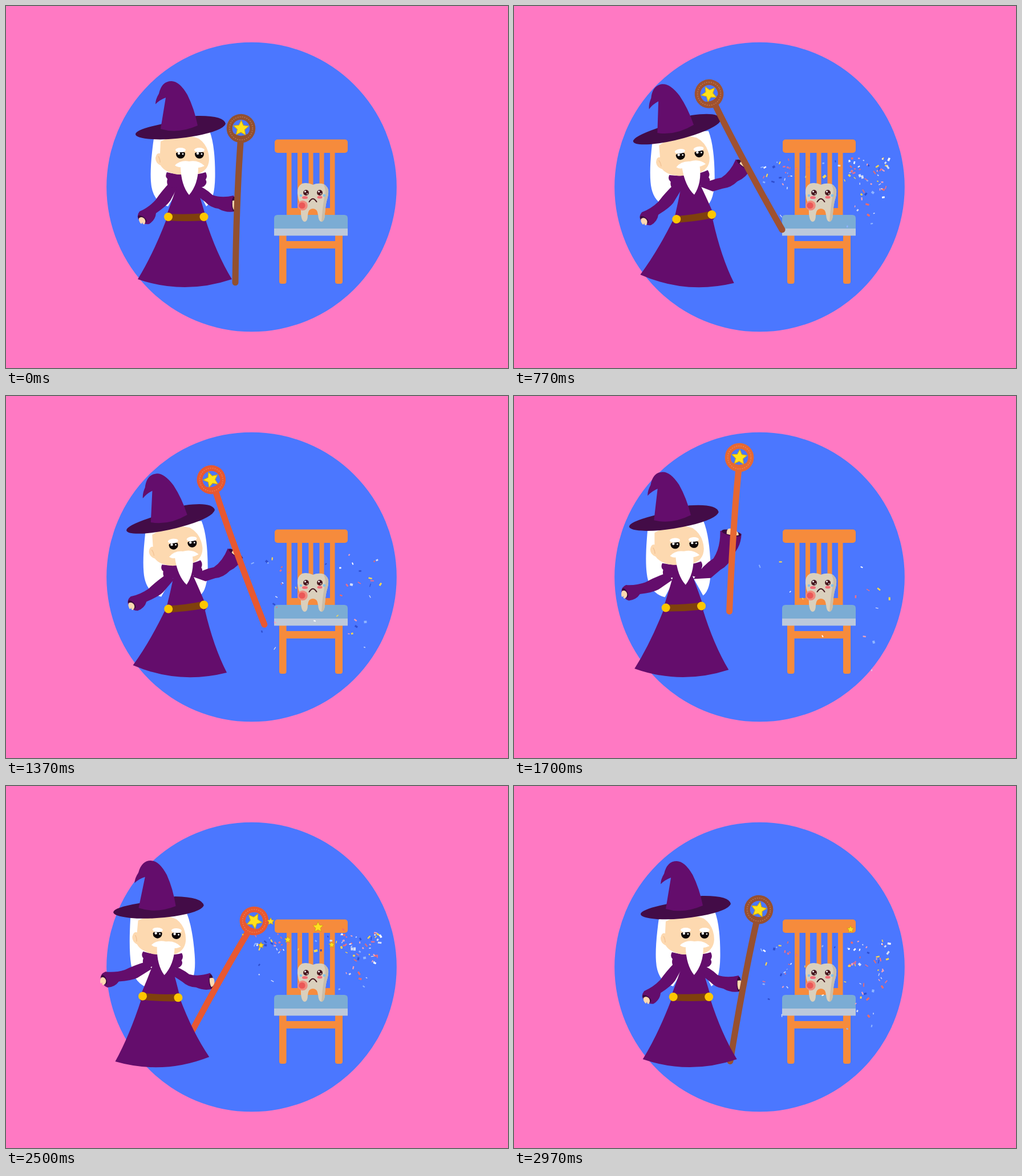
These frames come from a looping animation (880x636 px, 3010 ms). An HTML page:

```html
<!DOCTYPE html>
<html lang="en">
<head>
<meta charset="utf-8">
<title>Wizard and tooth</title>
<style>
html, body { margin: 0; width: 100%; height: 100%; overflow: hidden; background: #ff79c3; }
svg { display: block; width: 100vw; height: 100vh; }
</style>
</head>
<body>
<svg viewBox="0 0 880 636">
  <rect width="880" height="636" fill="#ff79c3"/>
  <circle cx="430.5" cy="318" r="254.3" fill="#4b77ff"/>

  <g id="chair" fill="#f68b3c">
    <rect x="471" y="234.500" width="128" height="23.500" rx="5"/>
    <path d="M492 257h8.500v98h67.500v-98h8.500v111h-84.500zM511 257h8v100h-8zM530.500 257h8v100h-8zM549.500 257h8v100h-8z"/>
    <path d="M479 402h12.500v11h85.500v-11h13v82q0 4-4 4h-5q-4 0-4-4v-58h-85.500v58q0 4-4 4h-4.500q-4 0-4-4z"/>
    <path d="M470 392v-19q0-6 6-6h117q6 0 6 6v19z" fill="#7bacd4"/>
    <rect x="470" y="391" width="129" height="12.500" fill="#bcc9db"/>
  </g>

  <g id="confetti"></g>

  <g id="tooth">
    <path d="M538 314Q528 309 519 312Q510 317 511 329Q512 339 515 347Q517 354 517 365Q518 379 524 379Q529 378 529 367Q530 356 538 356Q546 356 547 367Q548 379 553 379Q559 378 559 365Q560 352 562 343Q566 331 565 323Q562 313 553 312Q545 311 538 314Z" fill="#dad0bd"/>
    <path d="M557 314Q562 324 558 337Q555 352 553 379Q559 378 559 365Q560 352 562 343Q566 331 565 323Q562 315 557 314Z" fill="#c9bda9"/>
    <g fill="#f26d78"><ellipse cx="524" cy="336.500" rx="5" ry="2.600"/><ellipse cx="550" cy="336" rx="4.500" ry="2.500"/></g>
    <g fill="#461820"><circle cx="526" cy="328" r="4.900"/><circle cx="550" cy="328" r="4.900"/></g>
    <g fill="#fff"><circle cx="524.500" cy="326" r="1.500"/><circle cx="528" cy="330" r=".9"/><circle cx="548.500" cy="326" r="1.500"/><circle cx="552" cy="330" r=".9"/></g>
    <g fill="#83c1ed"><circle cx="517" cy="333" r="2.200"/><circle cx="558" cy="333" r="2.400"/></g>
    <path d="M531.500 344Q538 333.500 544.500 344" fill="none" stroke="#461820" stroke-width="2" stroke-linecap="round"/>
    <circle cx="520" cy="350.500" r="8.800" fill="#f18a7d"/><circle cx="519" cy="350.500" r="5.600" fill="#ea5757"/>
  </g>

  <path id="hair" d="M260 226Q252 280 254 308Q256 344 284 352L304 318H334L351 352Q366 342 366.500 300Q367 246 357 220Z" fill="#fff"/>

  <g id="rightArm">
    <path d="M330 312Q350 320 362 332Q378 338 399 333Q405 347 401 361Q386 364 372 356Q358 354 349 344L336 334Z" fill="#640d6c"/>
    <ellipse cx="399.500" cy="348" rx="3.800" ry="13" fill="#380a3d"/>
    <path d="M397 342q8-2 8 4q1 9-6 12q-3-5-2-16z" fill="#fdd9b0"/>
  </g>
  <g id="leftArm">
    <path d="M288 309Q272 326 262 341Q250 354 234 361Q228 369 233 376Q242 385 251 383Q262 376 263 364Q282 351 288 342L302 316Z" fill="#640d6c"/>
    <ellipse cx="239" cy="374" rx="9" ry="4" transform="rotate(35 239 374)" fill="#380a3d"/>
    <path d="M233 373q4-4 9 0q4 4 1 10q-3 2-4-3q-1 4-3 2q-4-5-3-9z" fill="#fdd9b0"/>
  </g>

  <g id="upper">
    <path d="M282 292Q300 297 318 296Q336 297 350 292Q354 299 350 305Q354 311 347 317Q341 320 334 317Q343 345 349 366V380H282V366Q291 342 299 318Q290 321 284 316Q281 310 283 304Q278 299 282 292Z" fill="#640d6c"/>
    <path d="M271 238Q304 220 338 233Q356 246 356 270Q355 291 332 296H301Q278 292 271 280Q262 276 262 267Q264 257 270 259Z" fill="#fdd9b0"/>
    <path d="M267 264q3 4 3 11" fill="none" stroke="#f3c395" stroke-width="1.500"/>
    <g id="eyes"></g>
    <path d="M296 280Q306 270 321 273Q337 270 348 281Q341 284 337 284Q337 313 321 332Q307 315 306 283Q301 284 296 280Z" fill="#fff"/>
    <path d="M227 225Q228 217 270 208L334 193Q382 192 385 207Q380 219 334 228Q290 236 256 234Q227 232 227 225Z" fill="#430c47"/>
    <path d="M271 216L280 161Q269 165 262 172.500Q262 164 268 154Q273 132 290 132Q304 132 318 156Q330 180 336 210Q302 225 271 216Z" fill="#640d6c"/>
  </g>

  <g id="staff">
    <path id="pole" d="M0 23Q-4 120-1 271" fill="none" stroke-width="11" stroke-linecap="round"/>
    <path id="base" d="M-12 9Q0 17 12 9L9 17H-9Z"/>
    <circle id="ring" r="20.300" fill="none" stroke-width="10"/>
    <circle r="20.300" fill="none" stroke="#ffc07a" stroke-opacity=".35" stroke-width="1.500" stroke-dasharray="2 2"/>
    <circle id="glow" r="14" fill="#ffdf12"/>
    <path id="orb" fill="#ffe21a" stroke="#d9a900" stroke-width="1" stroke-linejoin="round"/>
  </g>

  <path id="skirt" d="M282 373Q258 436 231 480Q313 508 396 480Q369 436 349 373Z" fill="#640d6c"/>
  <g id="belt">
    <path d="M282 364H349L351 378H280Z" fill="#640d6c"/>
    <path d="M284 365Q316 367 347 364V377Q316 379 284 377Z" fill="#7f400d"/>
    <g fill="#fdc600"><circle cx="284.500" cy="370.500" r="7.500"/><circle cx="347" cy="370.500" r="7.500"/></g>
  </g>
  <g id="magic"></g>
</svg>
<script>
const LOOP = 3010, STEP = 100 / 3;
const $ = id => document.getElementById(id);
const make = (parent, tag, attrs) => {
  const el = document.createElementNS('http://www.w3.org/2000/svg', tag);
  for (const key in attrs) el.setAttribute(key, attrs[key]);
  return parent.appendChild(el);
};

// time, hip, lean, skirt, hair, left, right, reach, ring x, ring y, staff, heat, gold
const poses = [
  [0, 0, 0, 0, 0, 0, 0, 1, 412, 215, 1.9, 0, 0],
  [370, 0, -2.6, 1.7, 0, 1, -15, 1.06, 400, 196, -6.2, 0, 0],
  [770, 0, -7.5, 5.2, -1, 3, -53.5, 1.1, 342, 154, -28.4, .15, 0],
  [1000, 0, -9, 5.8, -1, 5, -56, 1.1, 344, 145, -27, .5, 0],
  [1370, 0, -6.5, 4.5, -1, 12, -55, 1.1, 360, 147, -20.2, 1, 0],
  [1750, -22, -2, 0, -3, 30, -79, 1.35, 402, 106, 8, 1, .3],
  [2030, -45, 3.6, -4.2, -7, 45.5, -5, 1, 456, 251, 38.8, 1, 1],
  [2500, -45, 2.4, -2.8, -5, 30, -5, 1, 435, 237, 28.9, 1, 0],
  [2970, -5, .1, 0, 0, .6, 0, 1, 429, 217, 10.3, .05, 0]
];

// Monotone cubic interpolation of one pose column
const slope = (i, c) => (poses[i + 1][c] - poses[i][c]) / (poses[i + 1][0] - poses[i][0]);
function tangent(i, c) {
  if (i === 0 || i === poses.length - 1) return slope(Math.max(0, i - 1), c);
  const a = slope(i - 1, c), b = slope(i, c);
  return a * b <= 0 ? 0 : 2 * a * b / (a + b);
}
function sample(t, c) {
  let i = 0;
  while (i < poses.length - 2 && t >= poses[i + 1][0]) i++;
  const h = poses[i + 1][0] - poses[i][0], u = (t - poses[i][0]) / h, v = 1 - u;
  return poses[i][c] * (1 + 2 * u) * v * v + poses[i + 1][c] * u * u * (3 - 2 * u)
    + h * u * v * (v * tangent(i, c) - u * tangent(i + 1, c));
}

function starPath(r) {
  let d = '';
  for (let i = 0; i < 10; i++) {
    const a = i * Math.PI / 5, q = i % 2 ? r * .48 : r;
    d += (i ? 'L' : 'M') + (q * Math.sin(a)).toFixed(2) + ' ' + (-q * Math.cos(a)).toFixed(2);
  }
  return d + 'Z';
}
$('orb').setAttribute('d', starPath(14));

for (const x of [306, 339]) {
  make($('eyes'), 'circle', { cx: x, cy: 260, r: 8, fill: '#0b0608' });
  make($('eyes'), 'path', { d: `M${x - 10} 259Q${x} 254 ${x + 10} 258V250H${x - 10}Z`, fill: '#fdd9b0' });
  make($('eyes'), 'ellipse', { cx: x, cy: 253, rx: 9, ry: 4, fill: '#fff' });
  make($('eyes'), 'circle', { cx: x - 3, cy: 259, r: 2.2, fill: '#fff' });
  make($('eyes'), 'circle', { cx: x + 4, cy: 260, r: 1.4, fill: '#fff' });
}

// x, y, radius, appears, vanishes
const magic = [
  [415, 261, 8, 1880, 2535], [447, 280, 5.5, 1930, 2700], [494, 270, 6, 1930, 2700],
  [464, 238, 6.5, 2280, 2760], [547, 248, 9.5, 2300, 2820], [571, 279, 5.5, 2350, 2800],
  [590, 252, 6.5, 2740, 3150]
].map(([x, y, r, from, to]) => ({
  x, y, from, to,
  el: make($('magic'), 'path', { d: starPath(r), fill: '#ffe021', stroke: '#c99a12', 'stroke-width': .8 })
}));

let seed = 29;
const rand = () => (seed = seed * 16807 % 2147483647) / 2147483647;
const tints = ['#ef6f86', '#ee6a6a', '#f3a3b8', '#ffffff', '#d5def8', '#ffd84a', '#2f4fd0', '#8fb4ff'];
const bits = Array.from({ length: 95 }, () => {
  const zone = rand();
  const x = zone < .55 ? 588 + rand() * 68 : zone < .75 ? 436 + rand() * 46 : 480 + rand() * 110;
  const w = 2 + rand() * 4.5, h = 1.2 + rand() * 3;
  return {
    x, y: 248 + rand() * 26, fall: .04 + rand() * .43, drift: (rand() - .5) * 12,
    birth: rand() * 600, death: 950 + rand() * 850, turn: rand() * 360, spin: (rand() - .5) * .6,
    el: make($('confetti'), 'rect', { x: -w / 2, y: -h / 2, width: w, height: h, fill: tints[Math.floor(rand() * tints.length)] })
  };
});

const move = (el, x, y, rot = 0, scale = 1, px = 0, py = 0) => el.setAttribute('transform',
  `translate(${x} ${y}) rotate(${rot}) scale(${scale}) translate(${-px} ${-py})`);
const mix = (a, b, k) => a.map((v, i) => v + (b[i] - v) * k);
const BROWN = [146, 80, 48], RED = [232, 88, 49], GOLD = [224, 156, 58];

function draw(t) {
  const [hip, lean, skirt, hair, left, right, reach, ringX, ringY, staff, heat, gold] =
    poses[0].slice(1).map((_, i) => sample(t, i + 1));
  const hipX = 315.5 + hip, hipY = 370, a = lean * Math.PI / 180;
  // Carries a point of the resting upper body along with the lean
  const follow = (id, x, y, rot, scale) => {
    const dx = x - 315.5, dy = y - hipY;
    move($(id), hipX + dx * Math.cos(a) - dy * Math.sin(a),
      hipY + dx * Math.sin(a) + dy * Math.cos(a), rot, scale, x, y);
  };
  follow('hair', 322, 250, hair);
  follow('rightArm', 338, 312, right, reach);
  follow('leftArm', 288, 312, left);
  for (const id of ['upper', 'belt']) move($(id), hipX, hipY, lean, 1, 315.5, hipY);
  move($('skirt'), hipX, hipY, skirt, 1, 315.5, hipY);

  move($('staff'), ringX, ringY, staff);
  const wood = `rgb(${mix(mix(BROWN, RED, heat), GOLD, gold).map(Math.round)})`;
  $('pole').setAttribute('stroke', wood);
  $('ring').setAttribute('stroke', wood);
  $('base').setAttribute('fill', wood);
  $('glow').setAttribute('opacity', Math.max(0, gold * 2 - 1));

  for (const s of magic) {
    const size = Math.min(1, (t - s.from) / 100, (s.to - t) / 150);
    move(s.el, s.x, s.y, 0, Math.max(0, size));
  }
  const burst = t < 1930 ? t : t - 1930;
  for (const b of bits) {
    const age = burst - b.birth, on = age > 0 && burst < b.death;
    b.el.setAttribute('visibility', on ? 'visible' : 'hidden');
    if (on) move(b.el, b.x + b.drift * age / 1000, b.y + b.fall * age ** .85, b.turn + b.spin * age);
  }
}

function tick(now) {
  const step = Math.min(89, Math.floor((now % LOOP + 4) / STEP));
  draw(step * STEP);
  requestAnimationFrame(tick);
}
draw(0);
let start;
requestAnimationFrame(now => { start = now; tick(0); });
</script>
</body>
</html>
```
